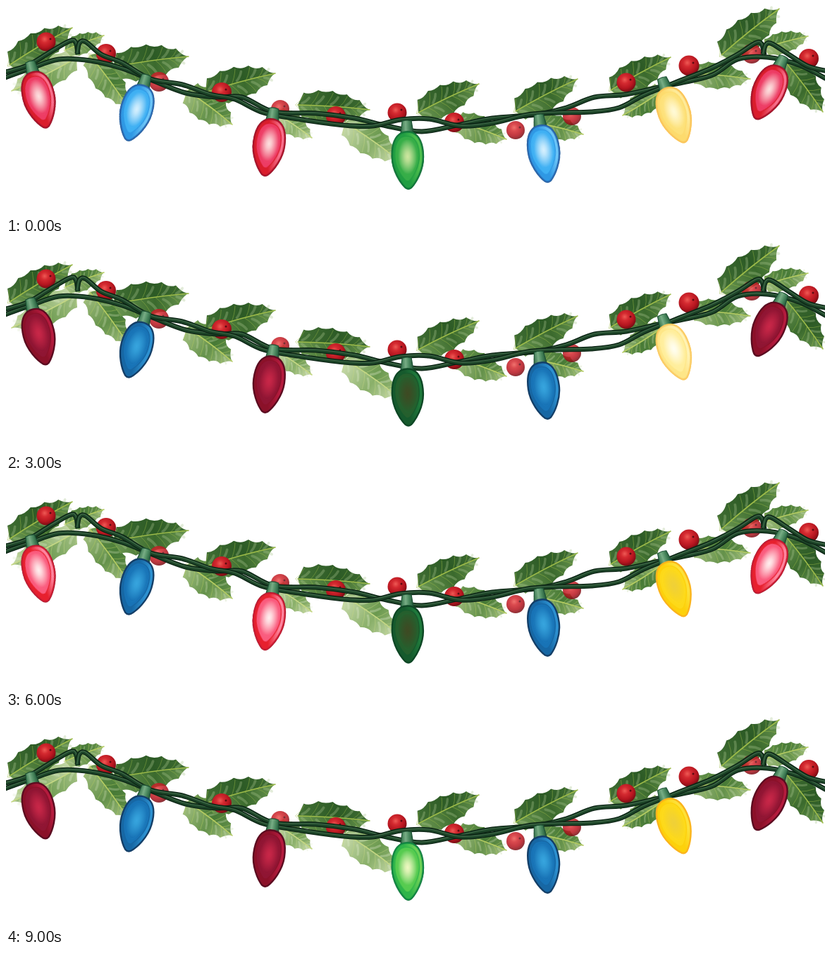
Recreate the animation shown at these times as an HTML page. Size 1162 px wide and 298 px high, loop 10000 ms.

```html
<!DOCTYPE html>
<html lang="en">
<head>
<meta charset="utf-8">
<title>Holly light garland</title>
<style>
html, body { margin: 0; width: 100%; height: 100%; overflow: hidden; background: #fff; }
svg { display: block; width: 1162px; height: 298px; }
.full, .glow { opacity: 0; }
.full { animation: full 10s step-end infinite; }
.red .full { animation-name: fullLong; }
.glow { animation: glow 5s step-end infinite; }
.red .glow { animation: full 10s step-end -4s infinite; }
.blue .glow { animation-delay: -3s; }
.yellow .glow { animation-delay: -2s; }
.green .glow { animation-delay: -1s; }
@keyframes full { 0% { opacity: 1; } 10%, 100% { opacity: 0; } }
@keyframes fullLong { 0% { opacity: 1; } 20%, 100% { opacity: 0; } }
@keyframes glow { 0% { opacity: 1; } 20%, 100% { opacity: 0; } }
</style>
</head>
<body>
<svg id="stage" viewBox="0 0 1162 298"></svg>
<script>
const deg = (x, y) => Math.atan2(y, x) * 180 / Math.PI;
const stop = (at, color, alpha = 1) =>
  `<stop offset="${at}" stop-color="${color}" stop-opacity="${alpha}"/>`;
let defs = '';

// Leaves: base x, y, tip x, y, half width, tone
const tones = [
  { top: ['#416f34', '#2c5a25'], low: ['#6c9852', '#3b6a2d'], shine: '#a9c58e', vein: '#9dbb49' },
  { top: ['#6b9650', '#477a36'], low: ['#a3c081', '#64914a'], shine: '#c7dbaf', vein: '#b5cc61' },
  { top: ['#a4c184', '#6b994f'], low: ['#cbdcae', '#89af69'], shine: '#dce8ca', vein: '#c4d783' }
];
tones.forEach((t, i) => ['top', 'low'].forEach(side => {
  defs += `<linearGradient id="${side}${i}">${stop(0, t[side][0])}${stop(.55, t[side][1])}${stop(1, t[side][0])}</linearGradient>`;
}));

const spikes = [[.07, .78], [.27, 1], [.47, 1.02], [.67, .86], [.85, .56]];

function leafSide(len, w, dir) {
  let d = 'M0,0', px = 0, py = w * .4;
  for (const [t, h] of [...spikes, [1, 0]]) {
    const x = t * len, y = h * w;
    const cx = px + (x - px) * .45, cy = Math.max(Math.min(py, y) * .83, w * .1);
    d += ` Q${cx},${dir * cy} ${x},${dir * y}`;
    px = x; py = y;
  }
  return d + ` Q${len * .5},${-w * .12} 0,0Z`;
}

function leaf([x, y, tx, ty, w, tone]) {
  const len = Math.hypot(tx - x, ty - y), c = tones[tone];
  let veins = '', shine = '';
  for (const [t, h] of spikes) {
    for (const dir of [-1, 1]) {
      const a = (t - .1) * len, b = t * len + 1, v = dir * h * w * .86;
      veins += `M${a},0 Q${a + len * .07},${v * .4} ${b},${v}`;
      shine += `M${a + len * .09},${v * .18} Q${b + len * .04},${v * .4} ${b + len * .07},${v * .72}`;
    }
  }
  return `<g transform="translate(${x} ${y}) rotate(${deg(tx - x, ty - y)})" fill="none" stroke-linecap="round">
    <path d="${leafSide(len, w, -1)}" fill="url(#top${tone})"/>
    <path d="${leafSide(len, w, 1)}" fill="url(#low${tone})"/>
    <path d="${shine}" stroke="${c.shine}" stroke-width="${len * .035}" opacity=".33"/>
    <path d="${veins}" stroke="${c.vein}" stroke-width=".7" opacity=".6"/>
    <path d="M0,0 Q${len * .5},${-w * .12} ${len},0" stroke="${c.vein}" stroke-width="1.6"/></g>`;
}

const leaves = [
  [100, 74, 8, 121, 21, 2], [5, 84, 94, 31, 23, 0], [84, 63, 139, 42, 15, 1],
  [119, 70, 173, 144, 21, 1], [152, 87, 259, 72, 25, 0],
  [257, 121, 321, 169, 23, 1], [283, 123, 382, 96, 24, 0],
  [383, 153, 434, 188, 16, 2], [414, 141, 516, 148, 23, 0],
  [481, 166, 556, 219, 23, 2], [585, 152, 671, 111, 22, 0],
  [638, 164, 710, 190, 20, 1], [723, 150, 811, 104, 22, 0],
  [751, 166, 819, 183, 18, 1], [932, 120, 875, 156, 18, 1],
  [858, 120, 943, 73, 22, 0], [972, 96, 1056, 104, 19, 1],
  [1015, 70, 1097, 4, 24, 0], [1075, 60, 1138, 43, 16, 1],
  [1106, 80, 1159, 151, 22, 0]
];

// Berries: x, y, radius, veiled
defs += `<radialGradient id="berry" cx=".42" cy=".36" r=".65">${stop(0, '#ee5a55')}${stop(.3, '#d42a30')}${stop(.7, '#b5151f')}${stop(1, '#760d14')}</radialGradient>`;
const berries = [
  [57, 51, 13.5], [142, 68, 14], [217, 108, 14, 1], [306, 123, 14], [389, 147, 13, 1],
  [468, 157, 14], [555, 152, 13.5], [636, 166, 14], [723, 177, 13, 1], [803, 157, 13, 1],
  [880, 109, 13.5], [969, 85, 14.5], [1058, 68, 14, 1], [1139, 75, 14]
];
const berry = ([x, y, r, veiled]) => `<g opacity="${veiled ? .85 : 1}">
  <circle cx="${x}" cy="${y}" r="${r}" fill="url(#berry)"/>
  <circle cx="${x + 6}" cy="${y - 4}" r="1.5" fill="#5d0b12"/></g>`;

// Cables: smooth curves through a few points
function curve(p) {
  let d = `M${p[0]}`;
  for (let i = 0; i < p.length - 1; i++) {
    const a = p[i - 1] || p[i], b = p[i], c = p[i + 1], e = p[i + 2] || c;
    d += ` C${b[0] + (c[0] - a[0]) / 6},${b[1] + (c[1] - a[1]) / 6} ${c[0] - (e[0] - b[0]) / 6},${c[1] - (e[1] - b[1]) / 6} ${c}`;
  }
  return d;
}
const cables = [
  [[-4, 103], [35, 89], [75, 76], [120, 78], [165, 89], [210, 107], [255, 124], [300, 130], [335, 130], [380, 151], [440, 153], [495, 160], [540, 171], [590, 179], [640, 170], [690, 160], [750, 155], [795, 145], [835, 130], [880, 126], [930, 115], [965, 108], [1003, 98], [1038, 76], [1080, 73], [1125, 84], [1166, 105]],
  [[-4, 95], [30, 85], [62, 66], [90, 50], [99, 52], [102, 69]],
  [[101, 68], [104, 53], [113, 51], [135, 69], [165, 81], [205, 104], [250, 112], [290, 126], [325, 133], [365, 152], [420, 162], [480, 170], [520, 171], [560, 162], [600, 161], [645, 171], [690, 167], [740, 155], [785, 152], [830, 151], [870, 145], [905, 127], [950, 109], [1000, 89], [1038, 69], [1063, 53], [1072, 54], [1076, 70]],
  [[1074, 69], [1078, 55], [1087, 54], [1112, 70], [1138, 86], [1166, 93]]
];
function cable(points) {
  const d = curve(points);
  return [['#0c2415', 7], ['#1c4427', 4.4], ['#4f7656', 1.2]]
    .map(([c, w], i) => `<path d="${d}" fill="none" stroke="${c}" stroke-width="${w}"${i === 2 ? ' transform="translate(0 -1)" opacity=".75"' : ''}/>`).join('');
}

// Bulb looks: edge, shaded side, lit side, inner, core
const looks = {
  red: {
    off: ['#5b0c20', '#8b1129', '#b51b3e', '#8f1533', '#c92748'],
    full: ['#ad142a', '#da1d2c', '#f9718f', '#ed3c64', '#fde2e0'],
    glow: ['#cc1c32', '#e7202e', '#ff86a0', '#fa5b7d', '#fff1f0']
  },
  blue: {
    off: ['#143f68', '#1767a4', '#2c90d0', '#1873b6', '#37a5de'],
    full: ['#2b6ab2', '#2f98e4', '#6cc6f8', '#3fb0f3', '#d8f1fe'],
    glow: ['#2a6fbb', '#3fa8f1', '#8fd3fb', '#69c3fa', '#fafdff']
  },
  yellow: {
    off: ['#fbb41c', '#fdd10b', '#fde139', '#fdd919', '#efd038'],
    full: ['#fbc75f', '#fddb6d', '#feeb9a', '#fde17a', '#fffad8'],
    glow: ['#fbce6a', '#fee687', '#fff3b5', '#ffee9c', '#fffef2']
  },
  green: {
    off: ['#0e4725', '#165a2d', '#1f7a3c', '#255f2d', '#3e4a23'],
    full: ['#127a3b', '#219e42', '#4fc04e', '#36ad48', '#cfe6a0'],
    glow: ['#128a44', '#2fb54a', '#70d257', '#56cb50', '#f0f8c2']
  }
};
const drop = 'M-8,1 C-18,6 -22,20 -22,35 C-22,54 -11,72 -4,79 Q0,82 4,79 C11,72 22,54 22,35 C22,20 18,6 8,1 Q0,-2 -8,1Z';

for (const hue in looks) for (const state in looks[hue]) {
  const [, shade, light, inner, core] = looks[hue][state], id = hue + state;
  defs += `<linearGradient id="${id}Body" x1="0" y1=".6" x2="1" y2=".4">${stop(0, shade)}${stop(.5, shade)}${stop(.85, light)}${stop(1, light)}</linearGradient>
    <radialGradient id="${id}Core" cx=".5" cy=".47" r=".5">${stop(0, core)}${stop(.25, core, .85)}${stop(1, inner)}</radialGradient>`;
}

function face(hue, state) {
  const id = hue + state, [edge, shade, light, inner] = looks[hue][state];
  return `<g class="${state}">
    <path d="${drop}" fill="url(#${id}Body)" stroke="${edge}" stroke-width="2.4"/>
    <path d="${drop}" transform="translate(-.8 6) scale(.79)" fill="${inner}" stroke="${shade}" stroke-width="1.6"/>
    <path d="${drop}" transform="translate(0 11) scale(.63)" fill="${inner}" stroke="${light}" stroke-width="1" stroke-opacity=".5"/>
    <path d="${drop}" transform="translate(0 11) scale(.63)" fill="url(#${id}Core)"/></g>`;
}

// Bulbs: hue, top x, y, tip x, y
const bulbs = [
  ['red', 38, 95, 57, 172], ['blue', 195, 114, 173, 190], ['red', 378, 162, 367, 241],
  ['green', 569, 180, 571, 260], ['blue', 758, 171, 769, 250], ['yellow', 936, 118, 963, 194],
  ['red', 1097, 87, 1065, 159]
];
defs += `<linearGradient id="cap">${stop(0, '#2d6b44')}${stop(.4, '#78ad85')}${stop(.65, '#4e8c62')}${stop(1, '#205637')}</linearGradient>`;
function bulb([hue, x, y, tx, ty]) {
  return `<g class="${hue}" transform="translate(${x} ${y}) rotate(${deg(tx - x, ty - y) - 90})">
    <path d="M-6.5,-16 Q0,-18 6.5,-16 L9,1 Q0,4 -9,1Z" fill="url(#cap)" stroke="#1d5134" stroke-width="1.2"/>
    ${['off', 'full', 'glow'].map(state => face(hue, state)).join('')}</g>`;
}

const draw = (list, part) => list.map(part).join('');
document.getElementById('stage').innerHTML = `<defs>${defs}</defs>` +
  draw(leaves, leaf) + draw(berries, berry) + draw(cables, cable) + draw(bulbs, bulb);
</script>
</body>
</html>
```
